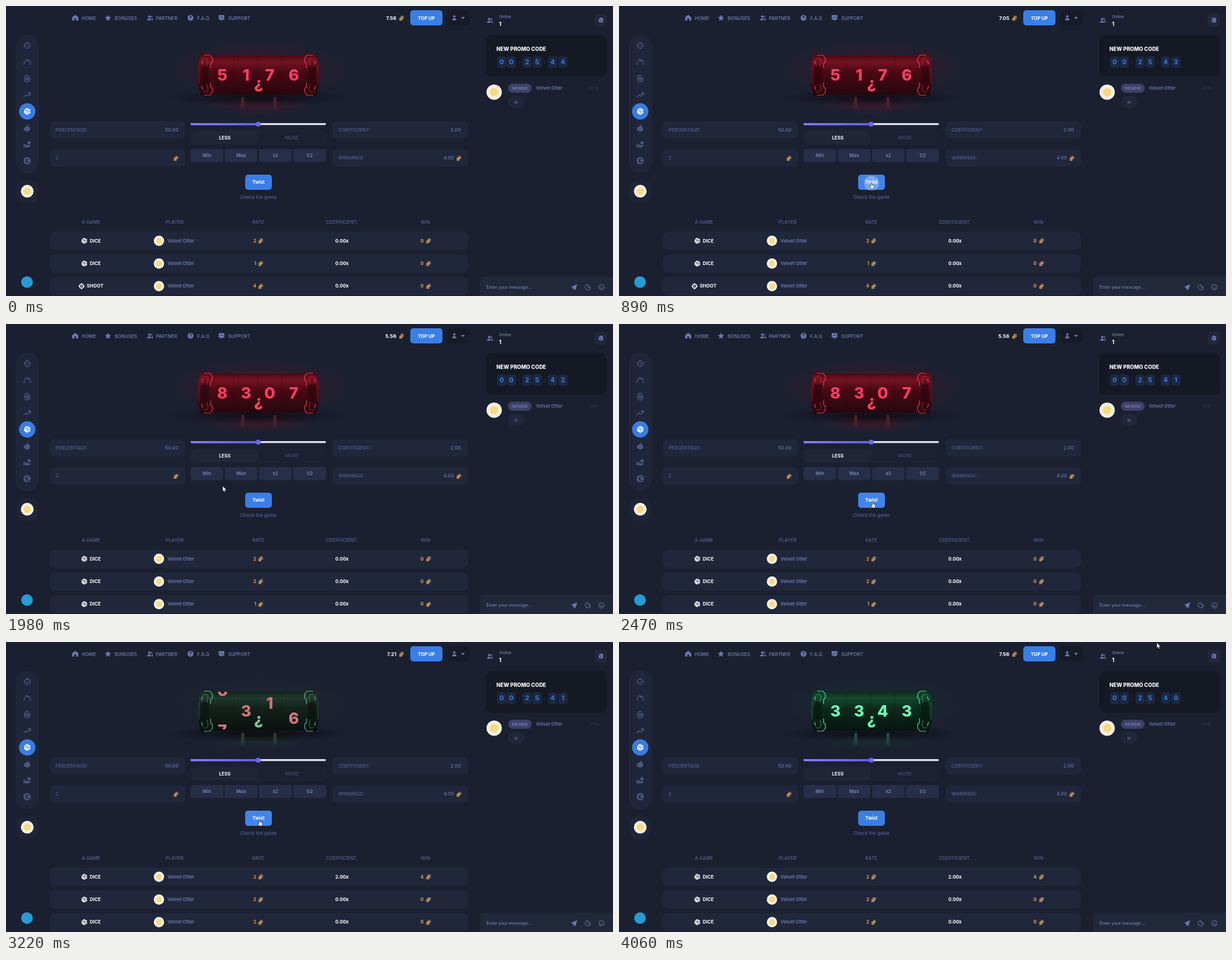
An HTML page for the animation above (4.16 s loop, 1000 by 478 pixels).

```html
<!DOCTYPE html>
<html lang="en">
<head>
<meta charset="utf-8">
<title>Dice</title>
<style>
html, body { margin: 0; height: 100%; overflow: hidden; background: #1b2030; }
svg { display: block; width: 100vw; height: 100vh; }
text { font: 600 7.7px Inter, sans-serif; fill: #4e5984; dominant-baseline: central; white-space: pre; }
.mid { text-anchor: middle; }
.end { text-anchor: end; }
.nav { font-weight: 500; fill: #7480b0; }
.white { font-weight: 700; fill: #fff; }
.name { fill: #6f7bb2; }
.gold { font-weight: 700; fill: #d9a05c; }
.btn { fill: #7885b8; }
.time { font-size: 10.5px; font-weight: 700; fill: #3b7de2; }
.digit { font-size: 26px; font-weight: 800; fill: inherit; text-anchor: middle; }
.panel { fill: #20273a; }
.icon { fill: none; stroke: #4d5881; stroke-width: 1.4; stroke-linecap: round; stroke-linejoin: round; }
.solid { fill: #6c78ad; }

.reel, .digits, .red, .green, .table, .check, .cursor, .hand, .arrow, .ripple {
  animation: 4160ms infinite;
}
.reel { animation-name: spin; animation-timing-function: ease; }
.digits { animation-name: tint; animation-timing-function: ease; }
.red { animation-name: lose; animation-timing-function: step-end; }
.green { animation-name: win; animation-timing-function: ease; }
.table { animation-name: lift; animation-timing-function: step-end; }
.check { animation-name: blank; animation-timing-function: step-end; }
.cursor { animation-name: move; animation-timing-function: ease-in-out; }
.hand { animation-name: hand; animation-timing-function: step-end; }
.arrow { animation-name: arrow; animation-timing-function: step-end; }
.ripple { animation-name: ripple; animation-timing-function: linear; }

@keyframes spin {
  0%, 22.55% { transform: translateY(calc(var(--a) * -66px)); }
  46.59%, 72.6% { transform: translateY(calc(var(--b) * -66px)); }
  96.63%, 100% { transform: translateY(calc(var(--c) * -66px)); }
}
@keyframes tint {
  0%, 72.6% { fill: #ff3b64; }
  96.63%, 100% { fill: #6affb4; }
}
@keyframes lose { 0% { opacity: 1; } 72.6%, 100% { opacity: 0; } }
@keyframes win {
  0%, 72.59% { opacity: 0; filter: saturate(.4) brightness(.8); }
  72.6% { opacity: 1; filter: saturate(.4) brightness(.8); }
  96.63%, 100% { opacity: 1; filter: saturate(1) brightness(1); }
}
@keyframes lift { 0% { transform: none; } 65.6% { transform: translateY(-16px); } 72.6%, 100% { transform: none; } }
@keyframes blank { 0% { opacity: 1; } 65.6% { opacity: 0; } 72.6%, 100% { opacity: 1; } }
@keyframes move {
  0% { transform: translate(886px, -20px); }
  10%, 34% { transform: translate(415.5px, 290.5px); }
  46%, 48.5% { transform: translate(357px, 267px); }
  59%, 84% { transform: translate(417.5px, 292.5px); }
  97%, 100% { transform: translate(886px, 1px); }
}
@keyframes hand { 0% { opacity: 0; } 9% { opacity: 1; } 37% { opacity: 0; } 57% { opacity: 1; } 87%, 100% { opacity: 0; } }
@keyframes arrow { 0% { opacity: 1; } 9% { opacity: 0; } 37% { opacity: 1; } 57% { opacity: 0; } 87%, 100% { opacity: 1; } }
@keyframes ripple {
  0%, 19% { opacity: 0; }
  20%, 21.5% { opacity: .3; }
  23%, 65.5% { opacity: 0; }
  66.5%, 68.5% { opacity: .3; }
  71%, 100% { opacity: 0; }
}
</style>
</head>
<body>
<svg id="stage" viewBox="0 0 1000 478" preserveAspectRatio="none"></svg>
<script>
const LOOP = 4160, ROW = 37.4, PLAYER = 'Velvet Otter';
const stage = document.getElementById('stage');

const text = (x, y, s, cls = '', more = '') => `<text x="${x}" y="${y}" class="${cls}" ${more}>${s}</text>`;
const rect = (x, y, w, h, r, fill) => `<rect x="${x}" y="${y}" width="${w}" height="${h}" rx="${r}" ` +
  (fill ? `fill="${fill}"/>` : 'class="panel"/>');
const disc = (x, y, r, fill) => `<circle cx="${x}" cy="${y}" r="${r}" fill="${fill}"/>`;
const at = (x, y, body, more = '') => `<g transform="translate(${x} ${y}) ${more}">${body}</g>`;
const line = (d, more = '') => `<path class="icon" d="${d}" ${more}/>`;
const solid = (d, more = '') => `<path class="solid" d="${d}" ${more}/>`;

const avatar = (x, y, r) => disc(x, y, r, 'url(#face)');
const coins = (x, y) => at(x, y, [-3.6, -1.8, 0].map(b => rect(-1.6, b, 5.6, 1.3, .6, '#c99a5e')).join('') +
  [0, 1.8, 3.6].map(b => rect(-4, b - .6, 5.4, 1.3, .6, '#d8a566')).join(''), 'scale(.95)');
const die = (x, y, s = 1, gap = '#20273a') => at(x, y,
  `<path fill="#fff" d="M0-5L4.4-2.5V2.5L0 5-4.4 2.5V-2.5Z"/>` +
  `<path fill="none" stroke="${gap}" stroke-width=".8" d="M-4.4-2.5L-1-1 1.5 4M-1-1L2-4M-1-1L4.4-.2"/>` +
  disc(-2.5, 1.6, .6, gap) + disc(2, 1.4, .6, gap), `scale(${s})`);
const sight = (r, color) => `<g fill="none" stroke="${color}" stroke-width="1.3"><circle r="${r}"/>` +
  `<path d="M0-${r + 1.7}v3M0 ${r + 1.7}v-3M-${r + 1.7} 0h3M${r + 1.7} 0h-3"/></g>` + disc(0, 0, 1, color);
const people = (x, y) => at(x, y, disc(-1, -2, 2, '#6c78ad') + solid('M-4.5 4V2.5Q-1-1 2 2.5V4Z') +
  disc(2.6, -2, 1.5, '#55608f') + solid('M3 4V1.4L2 .6Q4.5 0 5 2.5V4Z'));

const defs = () => `<defs>
  <radialGradient id="face"><stop offset="0" stop-color="#fff2bd"/><stop offset=".2" stop-color="#f6d471"/>
    <stop offset=".48" stop-color="#f6dc8e"/><stop offset=".66" stop-color="#f8f0dc"/><stop offset="1" stop-color="#f5f2ee"/></radialGradient>
  <linearGradient id="track"><stop offset="0" stop-color="#8a7dff"/><stop offset="1" stop-color="#6260ee"/></linearGradient>
  <radialGradient id="dark"><stop offset=".2" stop-color="#0d0e16" stop-opacity=".85"/><stop offset="1" stop-color="#0d0e16" stop-opacity="0"/></radialGradient>
  <clipPath id="window"><rect x="328" y="82" width="176" height="61.5"/></clipPath>
</defs>`;

function tube(cls, [low, mid, high, neon]) {
  // One corner clamp; the cap mirrors it downwards, the tube mirrors the cap.
  const clamp = `<g fill="none" stroke="${neon}" stroke-width="1.2" stroke-linejoin="round">` +
    `<path d="M322 96L324 90M326 81H336L340 86V92L337 95V102" opacity=".85"/>` +
    `<path d="M324 87L330 86 333 91 331 100" opacity=".4"/></g>`;
  const cap = `<path fill="url(#${cls}B)" d="M321 79H337L341 85V143L337 149H321L316.500 130V98Z"/>` +
    `<path fill="${low}" d="M322 100L334 97V131L322 128Z" opacity=".6"/>` +
    `<path d="M318 100V128" stroke="${neon}" opacity=".3"/>` + clamp + at(0, 228, clamp, 'scale(1 -1)');
  const leg = x => `<path fill="url(#${cls}L)" d="M${x - 2} 150H${x + 2}L${x + 4} 174H${x - 4}Z"/>`;
  return `<g class="${cls}"><defs>
    <linearGradient id="${cls}B" x2="0" y2="1"><stop offset="0" stop-color="${mid}"/><stop offset=".16" stop-color="${high}"/>
      <stop offset=".42" stop-color="${mid}"/><stop offset="1" stop-color="${low}"/></linearGradient>
    <linearGradient id="${cls}L" x2="0" y2="1"><stop offset="0" stop-color="${neon}" stop-opacity=".3"/><stop offset="1" stop-color="${neon}" stop-opacity="0"/></linearGradient>
    <radialGradient id="${cls}G"><stop offset=".3" stop-color="${high}" stop-opacity=".3"/><stop offset="1" stop-color="${high}" stop-opacity="0"/></radialGradient></defs>
    <ellipse cx="418" cy="104" rx="150" ry="46" fill="url(#${cls}G)"/>
    <ellipse cx="416" cy="158" rx="90" ry="22" fill="url(#${cls}G)"/>
    <ellipse cx="416" cy="151" rx="148" ry="14" fill="url(#dark)"/>
    ${leg(390)}${leg(443)}
    ${rect(330, 82, 172, 64, 2, `url(#${cls}B)`)}
    <path d="M375 83V145M415 83V145M455 83V145" stroke="${low}" opacity=".3"/>
    ${cap}${at(832, 0, cap, 'scale(-1 1)')}
    <text class="digit" transform="translate(416 131.5) rotate(180)" style="fill:${neon}">?</text></g>`;
}

const reel = (x, a, b, c) => `<g class="reel" style="--a:${a};--b:${b};--c:${c}">` +
  [...'0123456789'].map((d, i) => text(x, 113 + i * 66, d, 'digit')).join('') + '</g>';

function header() {
  const labels = [[125, 'HOME'], [179, 'BONUSES'], [247, 'PARTNER'], [315, 'F.A.Q'], [366, 'SUPPORT']];
  return labels.map(([x, s]) => text(x, 20, s, 'nav')).join('') +
    at(114, 19.5, solid('M0-5L5-1V4.500H1.500V1H-1.500V4.500H-5V-1Z')) +
    at(168, 19.5, solid('M0-5L1.600-1.700 5-1.200 2.500 1.200 3.100 4.700 0 3-3.100 4.700-2.500 1.200-5-1.200-1.600-1.700Z')) +
    people(237, 19.5) + disc(304, 19.5, 4.8, '#6c78ad') + text(304, 19.7, '?', 'mid', 'style="fill:#1b2030;font-weight:800"') +
    at(355, 19.5, solid('M-4.500-4.500H4.500V3H1.500L0 5-1.500 3H-4.500Z') + [-2, 0, 2].map(x => disc(x, -.7, .7, '#1b2030')).join('')) +
    text(643, 20, '7.56', 'white end', 'id="balance" style="font-size:8.2px"') + coins(651.5, 20) +
    rect(666, 7, 53, 25, 5, '#3a7fe6') + text(692.5, 20, 'TOP UP', 'white mid') +
    rect(727, 7, 37, 25, 6, '#171b28') + disc(738.5, 17.3, 2, '#6c78ad') + solid('M734.800 23.500Q735 20 738.500 20T742.200 23.500Z') +
    solid('M749.500 18H756L752.800 21.800Z');
}

function sidebar() {
  const icons = [
    sight(4.3, '#4d5881'),
    line('M-5.500 4Q-5-2 0-3T5.500 4M-2-4.500L2-1.500'),
    line('M0-5.500Q4.500-3 4.500 1T0 5.500-4.500 1 0-5.500M-2 2.500V0Q0-3 2 0V2.500M0 0V3'),
    line('M-5.500 3.500L-2 0 1 2 5-3M1.800-3.300H5.300V.2'),
    disc(0, 0, 13.5, '#3a7ce0') + die(0, 0, 1.15, '#3a7ce0'),
    `<path fill="#4d5881" d="M1-6.500Q1-3 3.500-1T4 4.500Q0 7.500-4 4.500T-3-1.500Q1-3 1-6.500Z"/>`,
    `<path fill="#4d5881" d="M-6-1H-3.800V5H-6ZM-3 0L1 1.500H5.500Q5 5 0 5H-3Z"/>` + disc(3, -2.5, 2.6, '#4d5881'),
    disc(0, 0, 6, '#4d5881') + disc(1, 0, 3.8, '#252c40') + disc(2.5, 0, 2.4, '#4d5881')];
  return rect(16, 47, 38, 229, 19, '#20263a') + icons.map((s, i) => at(35, 65.3 + i * 27.1, s)).join('') +
    rect(17, 287, 36, 37, 13, '#1f2536') + avatar(35, 305.3, 10.5) + disc(34.6, 455, 9.6, '#279bd5');
}

function controls() {
  const field = (x, y, label, value, end) => rect(x, y, 223, 28, 6) + text(x + 9.5, y + 14.2, label) +
    text(end, y + 14.2, value, 'end', 'style="fill:#606b99"');
  return field(72, 190, 'PERCENTAGE:', '50.00', 284) + field(538, 190, 'COEFFICIENT:', '2.00', 749.5) +
    field(72, 236.5, '2', '', 284) + coins(280, 250.8) + field(538, 236.5, 'WINNINGS:', '4.00', 738) + coins(746, 250.8) +
    rect(304, 193, 223, 3.2, 1.6, '#dcdeee') + rect(304, 193, 112, 3.2, 1.6, 'url(#track)') + disc(415.5, 194.7, 4, '#6b66f2') +
    `<rect x="304.500" y="206" width="222" height="22" rx="6" fill="#1c2132" stroke="#20273a"/>` + rect(306, 207, 109, 20, 5, '#202638') +
    text(360.5, 217, 'LESS', 'white mid') + text(471, 217, 'MORE', 'mid', 'style="fill:#3f4869"') +
    ['Min', 'Max', 'x2', '1/2'].map((s, i) => rect(304 + i * 56.4, 235.8, 53.8, 21.4, 4, '#272e47') +
      text(331 + i * 56.4, 246.7, s, 'btn mid')).join('') +
    rect(394, 278, 44, 25, 5, '#3a7ee6') + `<rect class="hand" x="394" y="278" width="44" height="25" rx="5" fill="#4284e9"/>` +
    text(416, 290.5, 'Twist', 'white mid') + text(416, 315, 'Check the game', 'mid check');
}

function row([game, rate, coef, prize], i) {
  const shoot = game === 'SHOOT';
  return at(0, 372 + i * ROW, rect(72, 0, 689, 30, 8) +
    (shoot ? at(124.5, 15, sight(3.4, '#fff')) : die(129, 15)) + text(shoot ? 133 : 138, 15, game, 'white') +
    avatar(252, 15, 8.5) + text(266, 15, PLAYER, 'name') +
    text(412.3, 15, rate, 'gold end') + coins(419.5, 15) +
    text(553.5, 15, coef, 'white mid') + text(688, 15, prize, 'gold end') + coins(696, 15));
}

function table() {
  const games = [['DICE', 2, '2.00x', 4], ['DICE', 2, '0.00x', 0], ['DICE', 2, '0.00x', 0],
    ['DICE', 1, '0.00x', 0], ['SHOOT', 4, '0.00x', 0], ['DICE', 2, '0.00x', 0]];
  const heads = ['A GAME', 'PLAYER', 'RATE', 'COEFFICIENT.', 'WIN'];
  return '<g class="table">' + heads.map((s, i) => text(140 + i * 137.8, 356.3, s, 'mid')).join('') +
    [2, 1, 0].map(n => `<g class="rows">${games.slice(n, n + 4).map(row).join('')}</g>`).join('') + '</g>';
}

function chat() {
  const cells = [816.5, 832.5, 858.5, 875, 900.5, 917.5];
  return people(797, 23.5) + text(812.5, 17.5, 'Online', 'nav', 'style="font-size:6.5px"') +
    text(812, 29.2, '1', 'white', 'style="font-size:9.5px"') +
    rect(970, 13, 20, 21, 5, '#222839') + at(980, 23.5, solid('M-3.500-2.500L0-4.500 3.500-3V3L.500 4.500-3.500 2.500Z') +
      `<path d="M-3.500-2L.300-.500V4.500" fill="none" stroke="#222839" stroke-width=".8"/>`) +
    rect(791, 48, 199, 68.5, 9, '#151924') + text(808, 70.5, 'NEW PROMO CODE', 'white', 'style="font-size:8.6px;font-weight:800"') +
    cells.map((x, i) => rect(x - 7.5, 83, 15, 19, 4, '#1b2842') + text(x, 92.6, '002544'[i], 'time mid', i === 5 ? 'id="second"' : '')).join('') +
    [845.5, 888].map(x => text(x, 92, ':', 'mid')).join('') +
    avatar(804.2, 142, 12.6) + rect(827, 128, 39, 15, 7.5, '#3d4167') + text(846.5, 135.6, 'NEWBIE', 'mid', 'style="font-size:6.7px;fill:#757db0"') +
    text(873, 135.5, PLAYER, '', 'style="fill:#6875aa"') + text(976, 135.5, '17:15', 'end', 'style="font-size:6.5px;fill:#30374f"') +
    rect(827, 148, 27, 20, 9, '#20273a') + text(840.3, 158, 'hi', 'mid', 'style="font-size:6px;fill:#69739f"') +
    rect(781, 446, 225, 40, 6, '#212839') + text(791.5, 463.5, 'Enter your message...', 'nav', 'style="font-size:7.2px"') +
    at(936, 463.5, solid('M5-5L2 5-.5 2.500-1.500 5-2 1-5-.5ZM5-5L-1 1.500')) +
    at(958.5, 463.5, line('M-1-4.500A4.500 4.500 0 1 0 4.500 1Q1 1 1-1T-1-4.500L4.500 1', 'style="stroke:#6c78ad;stroke-width:1"')) +
    at(981, 463.5, line('M-4.500 0A4.500 4.500 0 1 1 4.500 0 4.500 4.500 0 1 1-4.500 0M-2 1.300Q0 3.500 2 1.300M-1.600-1.500v.2M1.600-1.500v.2', 'style="stroke:#6c78ad;stroke-width:1"'));
}

const cursor = () => `<circle class="ripple" cx="416" cy="292" r="12.2" fill="#fff"/><g class="cursor">
  <path class="arrow" d="M0 0V9.200L2.100 7.300 3.500 10.300 5 9.600 3.600 6.700H6.400Z" fill="#fff" stroke="#11141e" stroke-width=".6"/>
  <path class="hand" d="M-.8.8Q0-.5.9.8V4.300L4.300 5.200Q5.200 5.600 4.900 7L4.300 10.500H-.2L-2.500 7.200Q-2.700 5.800-.8 7Z" fill="#fff" stroke="#11141e" stroke-width=".6"/></g>`;

stage.innerHTML = defs() + rect(0, 0, 1000, 478, 0, '#1b2030') + header() + sidebar() +
  tube('red', ['#26070d', '#490914', '#751322', '#ff4560']) + tube('green', ['#07150f', '#0c2b1d', '#15492f', '#63f7ac']) +
  '<g class="digits" clip-path="url(#window)">' +
  reel(356.5, 5, 8, 3) + reel(395.5, 1, 3, 3) + reel(434.5, 7, 0, 4) + reel(474, 6, 7, 3) + '</g>' +
  controls() + table() + chat() + cursor();

const balance = document.getElementById('balance');
const second = document.getElementById('second');
const sets = [...document.querySelectorAll('.rows')];
const ramp = (t, start) => 1 - (1 - Math.min(1, Math.max(0, (t - start) / 430))) ** 3;

let origin;
function tick(now) {
  origin ??= now;
  const t = (now - origin) % LOOP;
  balance.textContent = (7.56 - 2 * ramp(t, 850) + 2 * ramp(t, 3030)).toFixed(2);
  second.textContent = 4 - Math.floor((t + 600) / 1000);
  const shown = t < 938 ? 0 : t < 3020 ? 1 : 2;
  sets.forEach((g, i) => g.style.display = i === shown ? '' : 'none');
  requestAnimationFrame(tick);
}
requestAnimationFrame(tick);
</script>
</body>
</html>
```
